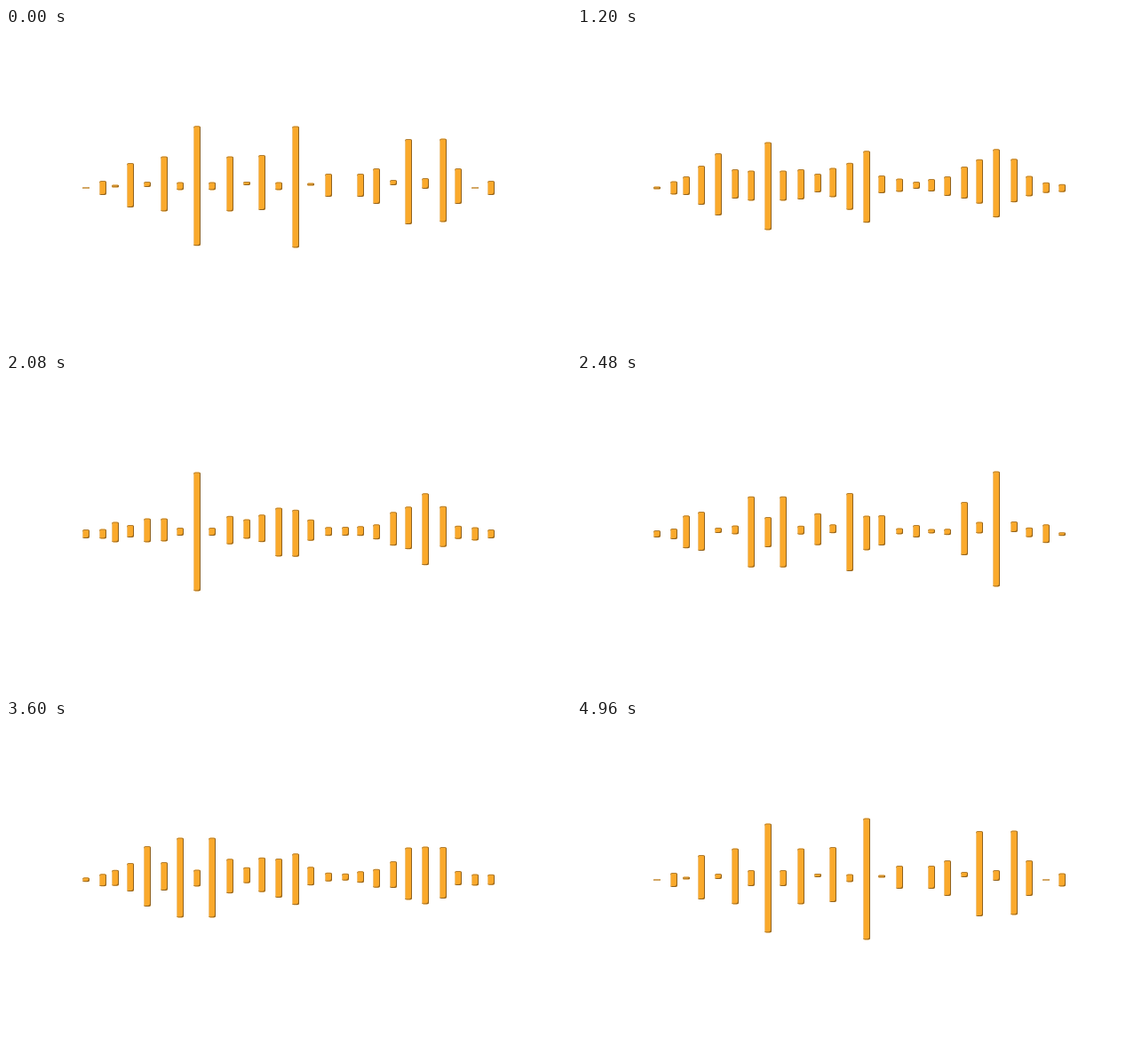
Animation, 636 px wide and 358 px high, one loop 5040 ms. Source, as an HTML page without scripts:

```html
<!DOCTYPE html>
<html lang="en">
<head>
<meta charset="utf-8">
<title>Sound wave</title>
<style>
html, body { margin: 0; width: 100%; height: 100%; overflow: hidden; background: #fff; }
.wave { position: relative; width: 636px; height: 358px; overflow: hidden; }

/* --x left edge, --y centre line, --a resting height, --b opposite height */
i {
  position: absolute;
  left: calc(var(--x) * 1px);
  top: calc(var(--y) * 1px);
  width: 8px;
  height: calc(var(--a) * 1px);
  translate: 0 -50%;
  border-radius: 2.5px;
  background: #faa92b;
  box-shadow: inset -1px -1px #8f6220, inset 0 1px #b07e34, inset 1px 0 #efc27c;
  animation: steady 5040ms linear infinite;
}
.slow { animation-name: slow; }
.easy { animation-name: easy; }
.mild { animation-name: mild; }
.brisk { animation-name: brisk; }
.quick { animation-name: quick; }
.lively { animation-name: lively; }
.rapid { animation-name: rapid; }

/* Every bar swings between its two heights at the pace of its group */
@keyframes slow {
  0%, 49.2%, 98.4%, 100% { height: calc(var(--a) * 1px); }
  24.6%, 72.8% { height: calc(var(--b) * 1px); }
}
@keyframes easy {
  0%, 33.33%, 66.67%, 100% { height: calc(var(--a) * 1px); }
  16.67%, 50%, 83.33% { height: calc(var(--b) * 1px); }
}
@keyframes steady {
  0%, 32.3%, 64.6%, 96.9%, 100% { height: calc(var(--a) * 1px); }
  16.15%, 48.45%, 80.75% { height: calc(var(--b) * 1px); }
}
@keyframes mild {
  0%, 31.6%, 63.2%, 94.8%, 100% { height: calc(var(--a) * 1px); }
  15.8%, 47.4%, 79% { height: calc(var(--b) * 1px); }
}
@keyframes brisk {
  0%, 30.8%, 61.5%, 92.3%, 100% { height: calc(var(--a) * 1px); }
  15.4%, 46.1%, 76.9% { height: calc(var(--b) * 1px); }
}
@keyframes quick {
  0%, 25.4%, 50.8%, 76.2%, 98.4%, 100% { height: calc(var(--a) * 1px); }
  12.7%, 38.1%, 63.5%, 88% { height: calc(var(--b) * 1px); }
}
@keyframes lively {
  0%, 22.9%, 45.8%, 68.7%, 97%, 100% { height: calc(var(--a) * 1px); }
  11.45%, 34.35%, 57.25%, 83% { height: calc(var(--b) * 1px); }
}
@keyframes rapid {
  0%, 20.9%, 41.2%, 61.2%, 81.2%, 99.2%, 100% { height: calc(var(--a) * 1px); }
  10.6%, 31%, 51.2%, 70.6%, 91.7% { height: calc(var(--b) * 1px); }
}
</style>
</head>
<body>
<div class="wave">
  <i class="lively" style="--x:86;--y:180;--a:1;--b:24"></i>
  <i class="lively" style="--x:105;--y:180;--a:16;--b:3"></i>
  <i style="--x:119;--y:177.5;--a:3;--b:39"></i>
  <i class="quick" style="--x:136;--y:177;--a:50;--b:2"></i>
  <i class="slow" style="--x:155;--y:176;--a:6;--b:72"></i>
  <i class="mild" style="--x:174;--y:175.5;--a:63;--b:4"></i>
  <i class="rapid" style="--x:192;--y:177.5;--a:9;--b:98"></i>
  <i class="rapid" style="--x:211;--y:177.5;--a:136;--b:9"></i>
  <i class="rapid" style="--x:228;--y:177.5;--a:9;--b:98"></i>
  <i style="--x:248;--y:175.5;--a:63;--b:8"></i>
  <i style="--x:267;--y:174.5;--a:4;--b:38"></i>
  <i style="--x:284;--y:174;--a:62;--b:7"></i>
  <i style="--x:303;--y:178;--a:9;--b:92"></i>
  <i class="brisk" style="--x:322;--y:179;--a:137;--b:14"></i>
  <i class="mild" style="--x:339;--y:176;--a:3;--b:38"></i>
  <i class="brisk" style="--x:359;--y:177;--a:26;--b:2"></i>
  <i class="mild" style="--x:378;--y:177;--a:0;--b:16"></i>
  <i class="mild" style="--x:395;--y:177;--a:26;--b:2"></i>
  <i class="mild" style="--x:413;--y:178;--a:40;--b:3"></i>
  <i style="--x:432;--y:174;--a:6;--b:63"></i>
  <i style="--x:449;--y:173;--a:96;--b:9"></i>
  <i style="--x:468;--y:174.5;--a:12;--b:137"></i>
  <i style="--x:488;--y:171.5;--a:95;--b:8"></i>
  <i class="brisk" style="--x:505;--y:178;--a:40;--b:3"></i>
  <i class="mild" style="--x:524;--y:180;--a:1;--b:24"></i>
  <i class="easy" style="--x:542;--y:180;--a:16;--b:3"></i>
</div>
</body>
</html>
```
